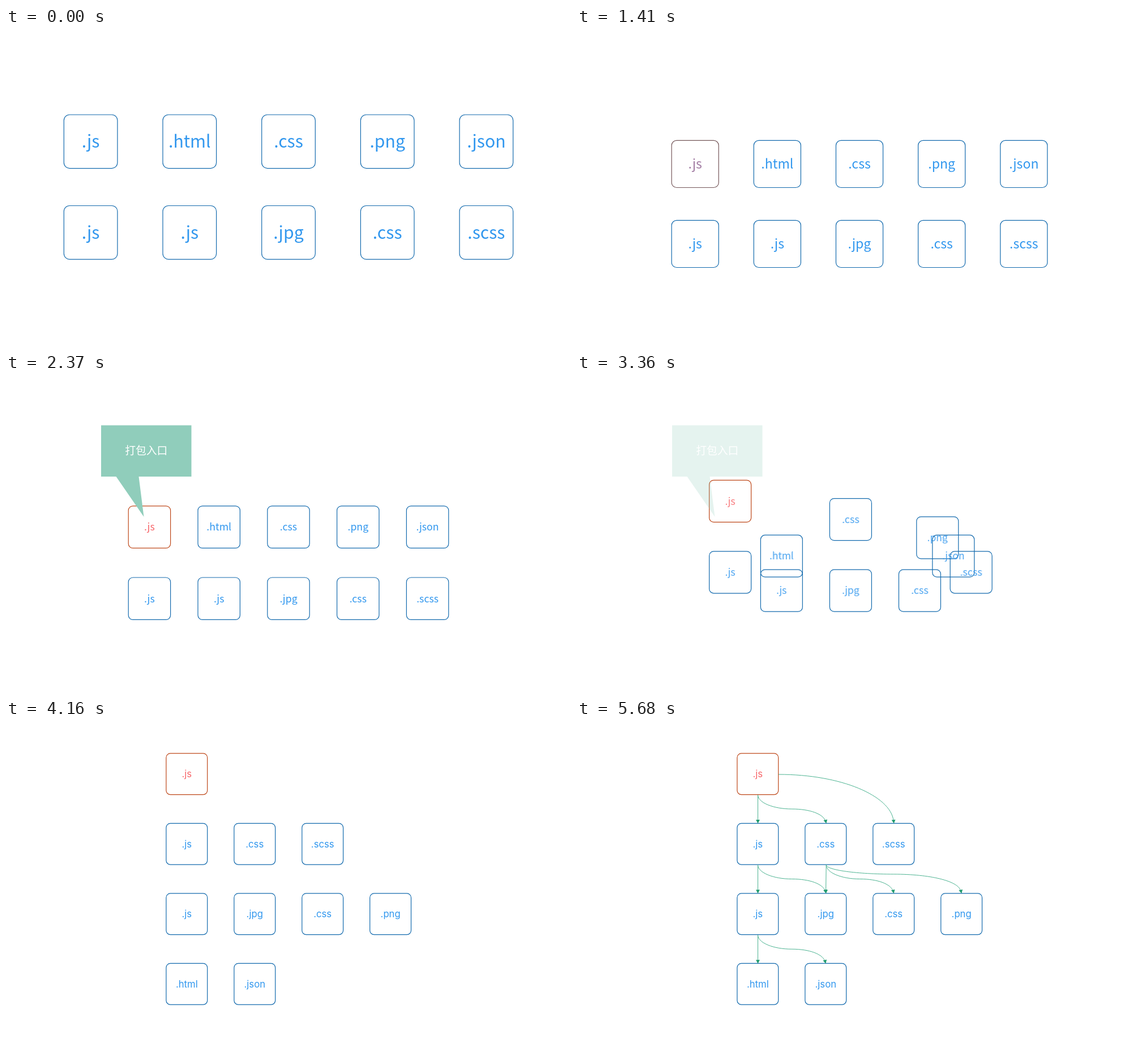
An HTML page for the animation above (5760 ms loop, 998 by 561 pixels).

```html
<!DOCTYPE html>
<html lang="zh">
<head>
<meta charset="utf-8">
<title>Bundle entry</title>
<style>
  html, body { margin: 0; width: 100%; height: 100%; overflow: hidden; background: #fff; }
  svg { display: block; width: 100vw; height: 100vh; }
  text { text-anchor: middle; }
  .han { font-family: "Noto Sans CJK SC", "Noto Sans CJK JP", "Noto Sans CJK", sans-serif; }
  .latin { font-family: Inter, "Liberation Sans", sans-serif; }
  .arrows path { fill: none; stroke: #4cb391; stroke-width: 1; }
  .arrows polygon { fill: #1f9a6e; }
</style>
</head>
<body>
<svg id="stage" viewBox="0 0 998 561">
  <defs id="defs"></defs>
  <g id="tiles"></g>
  <g id="links" class="arrows"></g>
  <g id="callout" opacity="0">
    <path d="M168 90.5H327.5V181H234.5L243.5 252L194.5 181H168Z" fill="#90cdbb"/>
    <text class="han" x="247.7" y="142" font-size="18.8" fill="#fff">打包入口</text>
  </g>
</svg>
<script>
const LOOP = 5760;
const SPREAD = { start: 1088, length: 980 };
const REGROUP = { start: 3176, length: 1000 };
const BLUE = { line: [20, 107, 174], text: [49, 151, 238] };
const RED = { line: [190, 72, 26], text: [247, 103, 107] };

const $ = id => document.getElementById(id);
const clamp = v => Math.min(1, Math.max(0, v));
const mix = (a, b, p) => a + (b - a) * p;
const mixColor = (a, b, p) => `rgb(${a.map((v, i) => Math.round(mix(v, b[i], p)))})`;
const progress = (t, start, length) => clamp((t - start) / length);

function add(parent, tag, attrs = {}) {
  const node = document.createElementNS('http://www.w3.org/2000/svg', tag);
  set(node, attrs);
  parent.appendChild(node);
  return node;
}
function set(node, attrs) {
  for (const key in attrs) node.setAttribute(key, attrs[key]);
}

// cubic-bezier(.25, .1, .25, 1)
function ease(x) {
  if (x <= 0 || x >= 1) return clamp(x);
  let lo = 0, hi = 1, s;
  for (let i = 0; i < 24; i++) {
    s = (lo + hi) / 2;
    if (0.75 * s * (1 - s) + s ** 3 < x) lo = s; else hi = s;
  }
  return 0.3 * s * (1 - s) ** 2 + 3 * (1 - s) * s * s + s ** 3;
}

// label, then column and row in the final tree
const tiles = [
  ['.js', 0, 0], ['.html', 0, 3], ['.css', 1, 1], ['.png', 3, 2], ['.json', 1, 3],
  ['.js', 0, 1], ['.js', 0, 2], ['.jpg', 1, 2], ['.css', 2, 2], ['.scss', 2, 1]
].map(([label, treeCol, treeRow], i) => {
  const col = i % 5 - 2, row = Math.floor(i / 5);
  const group = add($('tiles'), 'g');
  const tile = {
    entry: i === 0,
    poses: [
      { x: 499 + col * 174.7, y: 200.3 + row * 160.5, half: 47.3, r: 10, size: 30.2 },
      { x: 499 + col * 122.8, y: 270 + row * 126.2, half: 37.2, r: 8, size: 17.7 },
      { x: 319.3 + treeCol * 119.95, y: 95.3 + treeRow * 123.5, half: 36.4, r: 7.5, size: 17.2 }
    ],
    rect: add(group, 'rect', { fill: 'none', 'stroke-width': 1.2 }),
    han: add(group, 'text', { class: 'han' }),
    latin: add(group, 'text', { class: 'latin' })
  };
  tile.han.textContent = tile.latin.textContent = label;
  return tile;
});

const down = (x, y) => ({ d: `M${x} ${y}V${y + 45}`, tip: [x, y + 50.5], turn: 0 });
function bend(x, y, dx, mid) {
  const cx = x + dx / 2, my = y + mid;
  return {
    d: `M${x} ${y}C${x} ${y + mid * 0.56} ${x + dx * 0.23} ${my} ${cx} ${my}` +
       `S${x + dx - 6} ${my + (50 - mid) * 0.36} ${x + dx - 1.5} ${y + 45}`,
    tip: [x + dx + 0.5, y + 50.5], turn: -14
  };
}

const levels = [
  { top: 94, bottom: 183.5, start: 4240, arrows: [
    down(319.5, 132), bend(319.5, 132, 120.3, 25),
    { d: 'M356 96C468 96 553 134 559 177', tip: [559.8, 182.5], turn: -7 }
  ] },
  { top: 255, bottom: 307, start: 4720, arrows: [
    down(319.5, 255.5), bend(319.5, 255.5, 120, 25),
    { d: 'M440.2 255.5L439.6 301', tip: [439.5, 306], turn: 1 },
    bend(440.2, 255.5, 119, 25), bend(440.2, 255.5, 238.6, 16.5)
  ] },
  { top: 379, bottom: 430.5, start: 5200, arrows: [
    down(319.5, 379.2), bend(319.5, 379.2, 119.3, 25)
  ] }
];

levels.forEach((level, i) => {
  const clip = add($('defs'), 'clipPath', { id: 'wipe' + i });
  level.wipe = add(clip, 'rect', { x: 0, y: level.top, width: 998, height: 0 });
  const group = add($('links'), 'g', { 'clip-path': `url(#wipe${i})` });
  for (const { d, tip, turn } of level.arrows) {
    add(group, 'path', { d });
    add(group, 'polygon', {
      points: '0,0 -3.4,-6.4 3.4,-6.4',
      transform: `translate(${tip}) rotate(${turn})`
    });
  }
});

function drawTile(tile, spread, regroup) {
  const [a, b, c] = tile.poses;
  const at = key => mix(mix(a[key], b[key], spread), c[key], regroup);
  const x = at('x'), y = at('y'), half = at('half'), size = at('size');
  const heat = tile.entry ? spread : 0;
  const fill = mixColor(BLUE.text, RED.text, heat);
  set(tile.rect, {
    x: x - half, y: y - half, width: half * 2, height: half * 2, rx: at('r'),
    stroke: mixColor(BLUE.line, RED.line, heat)
  });
  set(tile.han, { x, y: y + size * 0.36, 'font-size': size, fill, opacity: 1 - regroup });
  set(tile.latin, { x, y: y + size * 0.35, 'font-size': size * 0.97, fill, opacity: regroup });
}

function draw(t) {
  const spread = ease(progress(t, SPREAD.start, SPREAD.length));
  const regroup = ease(progress(t, REGROUP.start, REGROUP.length));
  for (const tile of tiles) drawTile(tile, spread, regroup);

  const shown = progress(t, 2135, 235) - progress(t, REGROUP.start, 240);
  set($('callout'), { opacity: shown });

  for (const { wipe, top, bottom, start } of levels) {
    set(wipe, { height: (bottom - top) * progress(t, start, 480) });
  }
}

function frame() {
  draw(performance.now() % LOOP);
  requestAnimationFrame(frame);
}
frame();
</script>
</body>
</html>
```
